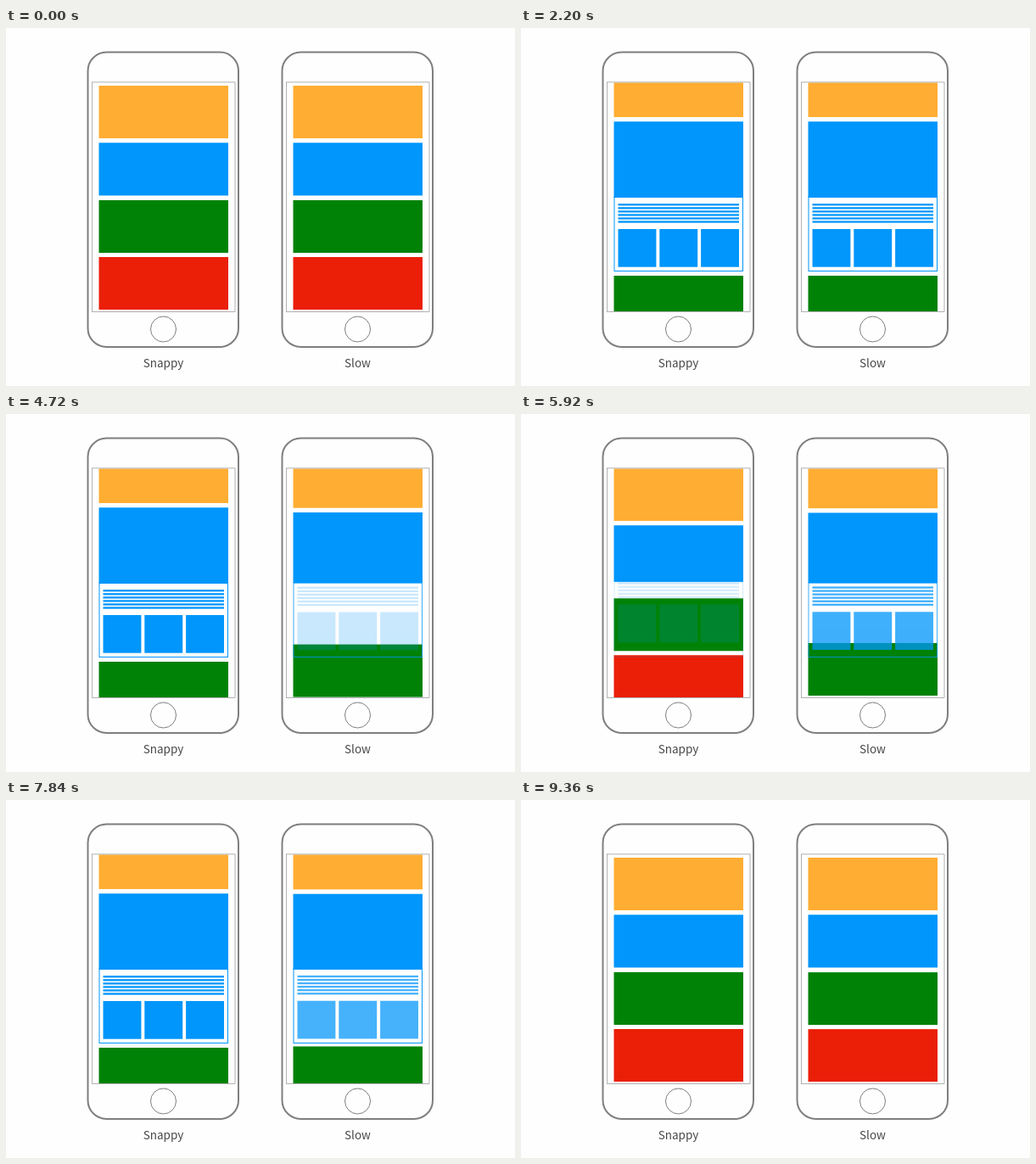
An HTML page that plays this animation: 600x422 px, repeating every 9.96 s.

```html
<!DOCTYPE html>
<html lang="en">
<head>
<meta charset="utf-8">
<title>Snappy and slow</title>
<style>
  html, body { margin: 0; width: 100%; height: 100%; overflow: hidden; background: #fefefe; }
  svg { display: block; width: 100vw; height: 100vh; }
  .frame { fill: none; stroke: #7f7f7f; }
  text { font: 13.5px "Noto Sans CJK SC", "Noto Sans CJK JP", "Noto Sans", sans-serif; fill: #484848; text-anchor: middle; }
</style>
</head>
<body>
<svg id="stage" viewBox="0 0 600 422">
  <defs><clipPath id="screen"><rect x="101" y="64.5" width="170" height="269.5"/></clipPath></defs>
</svg>
<script>
const LOOP = 9960, STEP = 40;
const BLUE = '#0096fb';
const stage = document.getElementById('stage');

// Times in ms at which each phone opens and closes its blue card.
const phones = [
  { label: 'Snappy', x: 0, move: 250, delay: 50, fade: 200,
    taps: [[1310, 2640], [4470, 5795], [7345, 8700]] },
  { label: 'Slow', x: 229, move: 600, delay: 200, fade: 800,
    taps: [[1310, 2980], [4470, 5874], [7345, 8790]] }
];

function add(parent, tag, attrs) {
  const el = document.createElementNS('http://www.w3.org/2000/svg', tag);
  for (const key in attrs) el.setAttribute(key, attrs[key]);
  return parent.appendChild(el);
}

const card = (parent, fill, y, height) =>
  add(parent, 'rect', { x: 109.5, y, width: 152.5, height, fill });

// Decelerating curve, cubic-bezier(0, 0, .2, 1).
function ease(x) {
  if (x <= 0) return 0;
  if (x >= 1) return 1;
  let lo = 0, hi = 1;
  for (let i = 0; i < 24; i++) {
    const s = (lo + hi) / 2;
    if (s * s * (0.6 + 0.4 * s) < x) lo = s; else hi = s;
  }
  return lo * lo * (3 - 2 * lo);
}

function build(phone) {
  const root = add(stage, 'g', { transform: `translate(${phone.x} 0)` });
  const screen = add(root, 'g', { 'clip-path': 'url(#screen)' });
  phone.orange = card(screen, '#ffad33', 68, 62);
  phone.blue = card(screen, BLUE, 135.3, 62.2);
  phone.green = card(screen, '#008207', 203, 62);
  phone.red = card(screen, '#eb1f07', 270, 62);
  phone.border = add(screen, 'rect', {
    x: 110, y: 199, width: 151.5, height: 87.5, fill: 'none', stroke: BLUE
  });
  phone.details = add(screen, 'g', { fill: BLUE });
  for (let i = 0; i < 6; i++)
    add(phone.details, 'rect', { x: 114.5, y: 207.1 + i * 4.05, width: 142.5, height: 2.3 });
  for (let i = 0; i < 3; i++)
    add(phone.details, 'rect', { x: 114.5 + i * 48.8, y: 237, width: 44.9, height: 44.7 });

  add(root, 'rect', { class: 'frame', x: 96.5, y: 28.5, width: 177.5, height: 347.5, rx: 22, 'stroke-width': 2 });
  add(root, 'rect', { class: 'frame', x: 101.5, y: 63.9, width: 168.5, height: 270.6, 'stroke-width': 0.6 });
  add(root, 'circle', { class: 'frame', cx: 185.5, cy: 355, r: 15, 'stroke-width': 1 });
  add(root, 'text', { x: 185.5, y: 400 }).textContent = phone.label;
}

function draw(phone, t) {
  let open = 0, shown = 0;
  for (const [opens, closes] of phone.taps) {
    const closed = ease((t - closes) / phone.move);
    open += ease((t - opens) / phone.move) - closed;
    shown += ease((t - opens - phone.delay) / phone.fade) - closed;
  }
  const blueTop = 135.3 - 25 * open;
  phone.orange.setAttribute('y', 68 - 25 * open);
  phone.blue.setAttribute('y', blueTop);
  phone.blue.setAttribute('height', 197.5 + 2.5 * open - blueTop);
  phone.green.setAttribute('y', 203 + 89 * open);
  phone.red.setAttribute('y', 270 + 89 * open);
  phone.border.setAttribute('opacity', open);
  phone.details.setAttribute('opacity', shown);
  phone.details.setAttribute('transform', `translate(0 ${-15 * (1 - open)})`);
}

const start = performance.now();
function tick() {
  const t = Math.floor((performance.now() - start) % LOOP / STEP) * STEP;
  phones.forEach(phone => draw(phone, t));
  requestAnimationFrame(tick);
}

phones.forEach(build);
tick();
</script>
</body>
</html>
```
